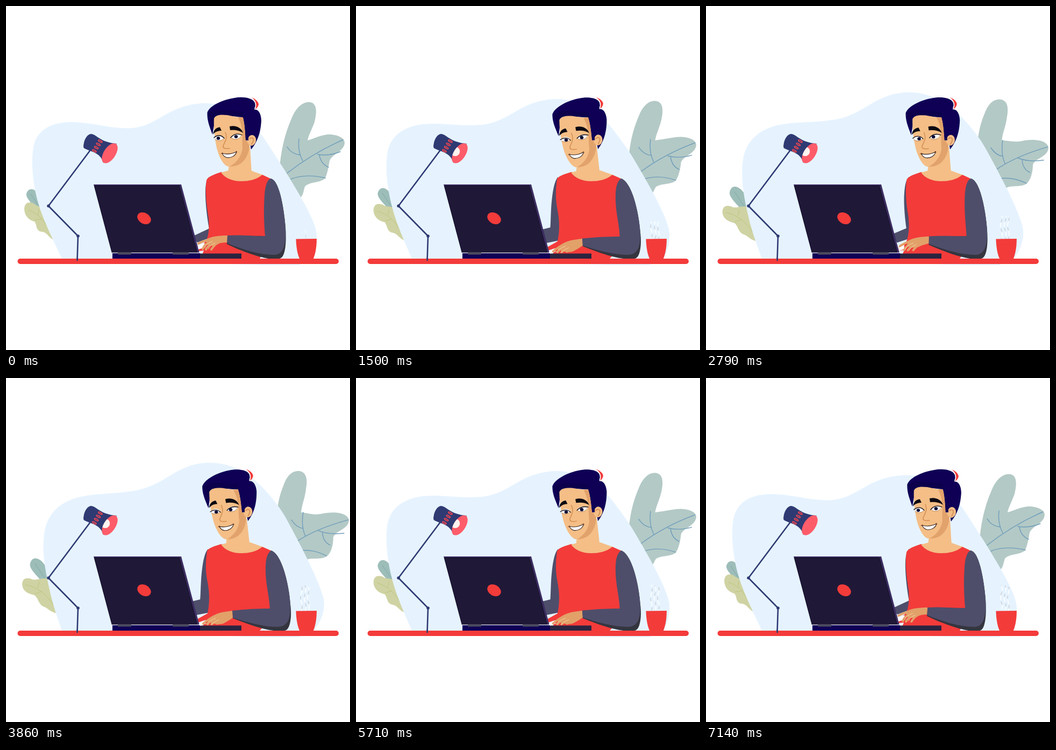
Write an HTML page that moves like this. It is 640x640 px and loops after 7.21 s.

```html
<!DOCTYPE html>
<html lang="en">
<head>
<meta charset="utf-8">
<title>Working at the desk</title>
<style>
  html, body { margin: 0; width: 100%; height: 100%; overflow: hidden; background: #fff; }
  svg { display: block; width: 100%; height: 100%; }
  .line { fill: none; stroke-linecap: round; stroke-linejoin: round; }
</style>
</head>
<body>
<!-- data-to: second pose of a path; data-by: the motion that blends the two -->
<svg viewBox="0 0 640 640">
  <defs>
    <clipPath id="shadeClip"><ellipse cx="193" cy="274" rx="21" ry="11" transform="rotate(-57 193 274)"/></clipPath>
    <clipPath id="steamClip"><rect id="steamWindow" x="540" width="35" height="60"/></clipPath>
  </defs>

  <g id="plant">
    <path fill="#b3c9c6" data-by="drift"
      d="M509 300 C513 260 520 235 533 205 C541 188 553 177 566 179 C578 181 579 195 574 216 C569 230 563 240 561 250 C575 246 583 241 598 239 C615 238 630 245 630 254 C630 270 607 275 602 288 C600 300 598 311 594 320 C585 330 565 326 556 336 C553 345 553 355 545 358 Z"
      data-to="M503 265 C505 235 508 220 516 200 C522 182 532 172 545 173 C559 175 561 188 558 205 C556 225 550 235 549 250 C562 251 572 256 586 253 C606 248 636 249 638 265 C637 282 615 283 609 296 C609 312 605 325 597 332 C588 338 575 335 562 337 C555 340 550 345 545 350 Z"/>
    <path class="line" stroke="#6f9dba" stroke-width="1.4" data-by="drift"
      d="M523 311 C555 286 590 265 627 249 M545 247 C543 265 546 277 552 288 M523 262 C529 272 538 276 547 277 M580 276 C596 279 610 276 622 271 M583 278 C586 290 591 296 600 300 M530 322 C550 314 575 315 594 320"
      data-to="M540 305 C566 287 600 274 637 264 M553 250 C550 268 551 281 557 294 M531 264 C537 273 545 279 553 280 M581 284 C595 290 612 291 629 289 M589 287 C589 299 595 307 603 311 M548 321 C566 319 580 323 596 331"/>
  </g>

  <g id="leaves">
    <path fill="#9dbdb9" data-by="drift"
      d="M64 385 C52 371 36 358 38 349 C41 339 50 338 57 346 C65 354 75 370 76 385 Z"
      data-to="M72 385 C62 371 42 356 45 345 C48 334 56 333 64 339 C75 347 82 365 82 385 Z"/>
    <path class="line" stroke="#7eaaa9" data-by="drift" d="M46 350 L66 380" data-to="M54 345 L76 378"/>
    <path fill="#cfd3a3" data-by="drift"
      d="M34 377 C35 365 43 364 51 367 C58 373 64 374 78 376 L92 436 C80 434 78 421 67 420 C55 419 58 407 53 401 C44 399 34 391 34 377 Z"
      data-to="M30 383 C31 372 39 371 47 374 C55 378 62 371 82 373 L96 438 C82 436 79 428 69 425 C60 420 60 409 53 404 C43 402 30 397 30 383 Z"/>
    <path class="line" stroke="#bcc47f" data-by="drift"
      d="M42 380 C58 385 72 398 84 424 M60 388 L61 378 M66 396 L54 398"
      data-to="M37 385 C55 388 74 400 90 424 M59 391 L62 380 M66 397 L54 402"/>
  </g>

  <path fill="#e6f3ff" data-by="drift"
    d="M104 470 C90 440 70 400 61 370 C50 335 46 290 51 262 C59 222 98 215 126 216 C170 218 195 229 235 227 C285 222 300 185 365 181 C415 179 450 205 478 243 C495 268 505 285 515 300 C540 340 577 400 578 425 C579 445 575 460 570 470 L545 482 H475 Z"
    data-to="M104 470 C98 452 87 422 81 393 C73 357 67 325 71 292 C74 262 91 238 122 226 C152 214 190 217 235 210 C285 203 305 175 345 162 C390 149 435 163 470 196 C490 215 510 240 522 262 C548 310 582 375 591 410 C595 430 587 453 573 470 L545 482 H475 Z"/>

  <g id="steam" class="line" stroke-width="1.8" clip-path="url(#steamClip)"></g>

  <g id="lamp">
    <path class="line" stroke="#2f3a73" stroke-width="2.6" d="M157 268 L79 372 L134 428 L132.500 473"/>
    <g fill="#2f3a73"><circle cx="79" cy="372" r="2.800"/><circle cx="134" cy="428" r="2.800"/></g>
    <path fill="#2f3a73" d="M144 261 C145 248 151 239 158 238 C168 238 175 254 206 256 L181 292 C176 272 157 271 146 265 Q144 264 144 261 Z"/>
    <g id="slits" fill="#2f3a73" stroke="#f0474f" stroke-width="1.700"></g>
    <ellipse cx="193" cy="274" rx="21" ry="11" transform="rotate(-57 193 274)" fill="#ff5c6a"/>
    <circle id="bulb" cx="184.500" cy="270.500" r="8.800" fill="#fff4f1" clip-path="url(#shadeClip)"/>
  </g>

  <g id="body">
    <path fill="#4e4e6b" data-by="lean"
      d="M378 318 C371 324 371 340 371 350 C371 365 374 395 378 414 L346 429 L356 440 L382 430 Z"
      data-to="M376 318 C368 326 365 350 363 375 C362 390 362 403 361 412 L344 416 L354 441 L380 436 Z"/>
    <path fill="#f33b3a" data-by="lean"
      d="M400 309 C388 313 376 317 373 324 C370 345 373 370 377 395 C378 410 378 425 372 438 L358 449 V456 L368 455 L362 470 H472 L484 450 L490 400 L494 322 L477 314 Z"
      data-to="M400 309 C388 313 378 315 374 322 C371 345 371 360 375 380 C379 400 379 420 375 438 L357 448 V455 L372 450 L362 470 H472 L492 450 L496 400 L495 322 L477 314 Z"/>
    <path fill="#f4be86" d="M400 310 L414 306 H455 L477 314 C466 323 452 326 438 326 C420 326 408 320 400 310 Z"/>
  </g>

  <g id="head">
    <path fill="#f4be86" d="M416 285 L413 311 L457 311 L454 262 Z"/>
    <path fill="#0f0056" d="M384 239 C377 220 374 211 374.500 198 C380 184 405 174 425 171 C440 168 456 171 461 177 C466 182 465 189 462 193 C471 191 475 204 475 213 C474 232 470 250 456 267 L453 249 L445 250 L439 204 L390 206 Z"/>
    <path fill="#0c004c" d="M377 199 C395 187 417 196 441 197 L442 207 C425 207 405 200 389 206 L385 224 Z"/>
    <path fill="#f33b3a" d="M457 170 C465 173 470 179 470 183 C469 188 466 191 463 192 C467 184 464 176 457 170 Z"/>
    <path class="line" stroke="#fff" stroke-width="1.600" d="M458 171.500 C465 178 466 185 463 191"/>
    <path fill="#f4be86" d="M387 209 C391 202 400 202 412 203 C423 205 432 208 441 207 C445 225 445 239 446 250 L452 252 C455 268 449 283 438 292 C428 299 418 300 411 298 C402 293 395 277 392 264 C388 246 386 226 387 209 Z"/>
    <path fill="#e2a26b" d="M432 207.500 L441 207 C445 225 445 239 446 250 L453 252 C454 268 449 283 438 292 C430 298 422 299 416 298.500 C431 290 438 279 440 265 C438 252 444 230 432 207.500 Z"/>
    <ellipse cx="457" cy="250" rx="8" ry="10" fill="#f4be86" transform="rotate(12 457 250)"/>
    <path class="line" stroke="#d4925c" stroke-width="2" d="M453 247 C460 242 463 249 457 257"/>
    <path fill="#0f0056" d="M439 204 C447 206 455 215 455 240 Q450 241 451 250 L446 250 C445 235 445 220 441 207 Z"/>
    <path fill="#0c0912" d="M385 239 C386 230 392 226 398 225.500 L401 232 C394 232 389 234 385 239 Z M416 224 C427 221 438 226 441 236 C434 231 425 230 417 231 Z"/>
    <path fill="#fff" d="M388 246 C392 240 400 239 406 246 C402 251 392 252 388 246 Z M418 244 C424 237 432 237 438 241 C436 248 424 250 418 244 Z"/>
    <g fill="#0b0b35"><ellipse id="leftPupil" cy="246" rx="3.300" ry="2.900"/><ellipse id="rightPupil" cy="243" rx="3.300" ry="3"/></g>
    <path class="line" stroke="#0c0912" stroke-width="1.300" data-by="lean"
      d="M387 245 C392 240 400 239 406 246 M418 245 C424 237 432 237 439 240"
      data-to="M387 246 C393 242 401 242 406 248 M418 245 C424 239 432 238 439 240"/>
    <path class="line" stroke="#a26a38" stroke-width=".7" d="M389 248 C394 252 401 251 405 247 M420 246 C426 250 434 248 437 242"/>
    <path class="line" stroke="#d28d50" stroke-width="1.500" d="M408 235 C413 246 407 253 404 260 C403 265 408 266 416 265"/>
    <path fill="#fff" stroke="#35201a" stroke-width="1.100" d="M402 274 C412 277 421 275 429 271 C427 279 419 283 411 282 C406 281 404 278 402 274 Z"/>
    <path class="line" stroke="#8a4c2d" d="M400 275 L403 273 M428 270 L430 272"/>
  </g>

  <g id="laptop">
    <path fill="#0f0056" d="M198 460 H361 V470 H198 Z"/>
    <path fill="#2b2440" d="M361 460.500 H438 V470 H361 Z"/>
    <path fill="#3c2d61" d="M163 332 H326 L360 460 H197 Z"/>
    <path fill="#1f1937" stroke="#110c24" d="M164.500 334.500 H322.500 L355.500 458.500 H197.500 Z"/>
    <path class="line" stroke="#eceaf5" stroke-width="1.200" d="M197 459.300 H360"/>
    <path fill="#4b4a5e" d="M208 458 H233 V462.500 H208 Z M310 458 H340 V462.500 H310 Z"/>
    <ellipse cx="257" cy="395" rx="13.500" ry="10" transform="rotate(30 257 395)" fill="#f33b3a"/>
  </g>

  <g id="arm">
    <path fill="#35353f" data-by="lean"
      d="M492 321 C508 322 517 375 520 412 C522 440 520 470 508 470 L488 470 C470 467 440 457 411 443 L412 427 L482 428 Z"
      data-to="M493 321 C512 326 526 380 529 420 C532 440 530 470 518 470 L498 470 C475 467 450 458 422 447 L421 433 L491 429 Z"/>
    <path fill="#4e4e6b" data-by="lean"
      d="M492 321 C508 322 517 375 520 412 C521 440 518 462 500 463 C470 463 440 453 411 441 L412 427 C435 425 465 429 482 428 C480 405 479 380 481 352 C482 337 485 324 492 321 Z"
      data-to="M493 321 C512 326 526 380 529 420 C530 445 526 463 505 463 C480 463 450 455 422 446 L421 433 C445 430 470 429 491 429 C490 405 482 380 483 352 C483 338 486 326 493 321 Z"/>
    <path fill="#fff" data-by="lean" d="M357 445 L370 441 L367 450 L358 453 Z" data-to="M359 458 L367 452 L372 457 L361 461 Z"/>
    <path fill="#e2a169" data-by="lean"
      d="M412 427 C395 427 380 429 371 435 L374 444 C382 447 390 447 396 442 C403 440 407 440 411 440 Z"
      data-to="M421 433 C407 435 395 436 384 443 L374 452 C384 459 398 459 404 457 C412 453 418 449 422 446 Z"/>
    <path class="line" stroke="#e2a169" stroke-width="4" data-by="lean"
      d="M374 436 C367 437 362 440 358 442 M379 440 C371 442 368 447 366 452 M385 441 C379 444 374 449 372 453 M391 442 C387 446 384 450 382 453"
      data-to="M386 444 C378 448 372 453 367 457 M390 447 C383 450 378 454 375 458 M396 449 C391 452 386 455 383 458 M402 449 C399 453 396 456 393 457"/>
    <path class="line" stroke="#f9d7ae" stroke-width=".9" data-by="lean"
      d="M384 438 C375 441 371 445 370 450 M389 441 C382 444 378 448 377 452"
      data-to="M390 447 C382 450 376 454 372 458 M396 450 C389 453 384 456 381 459"/>
  </g>

  <rect x="21.500" y="470" width="597.500" height="10" rx="5" fill="#f33b3a"/>
  <path class="line" stroke="#2f3a73" stroke-width="2.600" d="M132.600 469 V473"/>
  <path fill="#f33b3a" d="M539.500 433.500 L578 433 C578 451 575 463 571 472 H547 C542 462 540 449 539.500 433.500 Z"/>
</svg>

<script>
const LOOP = 7210, FRAMES = 101;
const byId = id => document.getElementById(id);
const clamp = v => Math.min(1, Math.max(0, v));
const sineEase = v => (1 - Math.cos(Math.PI * clamp(v))) / 2;

function add(parent, tag, attributes) {
  const node = document.createElementNS('http://www.w3.org/2000/svg', tag);
  for (const name in attributes) node.setAttribute(name, attributes[name]);
  return byId(parent).appendChild(node);
}

for (let i = 0; i < 4; i++) {
  const x = 175.5 - i * 3.7, y = 251.5 + i * 6;
  add('slits', 'ellipse', { cx: x, cy: y, rx: 4, ry: 1.5, transform: `rotate(28 ${x} ${y})` });
}

const strands = [549.5, 556.5, 562.5].flatMap((x, i) => ['#ffffff', '#ccd5da'].map((stroke, j) => ({
  speed: 8 + 3 * i, phase: 7 * i + 9 * j,
  node: add('steam', 'path', {
    stroke, 'stroke-dasharray': j ? '5 13' : '9 9',
    d: `M${x} 433 q3 -8 0 -16 t0 -16 t0 -${16 - i * 2}`
  })
})));

const tokens = d => d.match(/[A-Z]|-?[\d.]+/g);
const morphs = [...document.querySelectorAll('[data-to]')].map(node => ({
  node, by: node.dataset.by, from: tokens(node.getAttribute('d')), to: tokens(node.dataset.to)
}));

// Three typing cycles per loop: lean in, hold, lean back.
function leanAt(time) {
  const phase = time * 3 / LOOP % 1;
  return phase < 0.5 ? sineEase(phase / 0.42) : sineEase((1 - phase) / 0.42);
}

function draw(time) {
  const drift = (1 - Math.cos(2 * Math.PI * time / LOOP)) / 2;
  const lean = leanAt(time);
  const motion = { drift, lean };

  for (const { node, by, from, to } of morphs)
    node.setAttribute('d', from.map((a, i) => isNaN(a) ? a : (+a + (to[i] - a) * motion[by]).toFixed(2)).join(' '));

  byId('head').setAttribute('transform', `rotate(${-3 * lean} 440 380)`);
  byId('leftPupil').setAttribute('cx', 395 + 4 * clamp(drift * 2.5) - lean);
  byId('leftPupil').setAttribute('cy', 246 + lean);
  byId('rightPupil').setAttribute('cx', 428 - 3 * drift);
  byId('rightPupil').setAttribute('cy', 243 + lean);
  byId('bulb').setAttribute('opacity', clamp(drift * 2.7));

  const height = 17 + 31 * Math.sin(Math.PI / 2 * clamp(time / 4600));
  byId('steamWindow').setAttribute('y', 433 - height);
  byId('steam').setAttribute('opacity', 0.55 + 0.35 * clamp(time / 1500));
  strands.forEach(({ node, speed, phase }, i) => {
    node.setAttribute('stroke-dashoffset', phase - speed * time / 1000);
    node.setAttribute('opacity', i >> 1 === 1 ? 1 : clamp(time / 900));
  });
}

function tick(now) {
  const step = LOOP / FRAMES;
  draw(Math.floor((now % LOOP + 5) / step) % FRAMES * step);
  requestAnimationFrame(tick);
}
draw(0);
requestAnimationFrame(tick);
</script>
</body>
</html>
```
